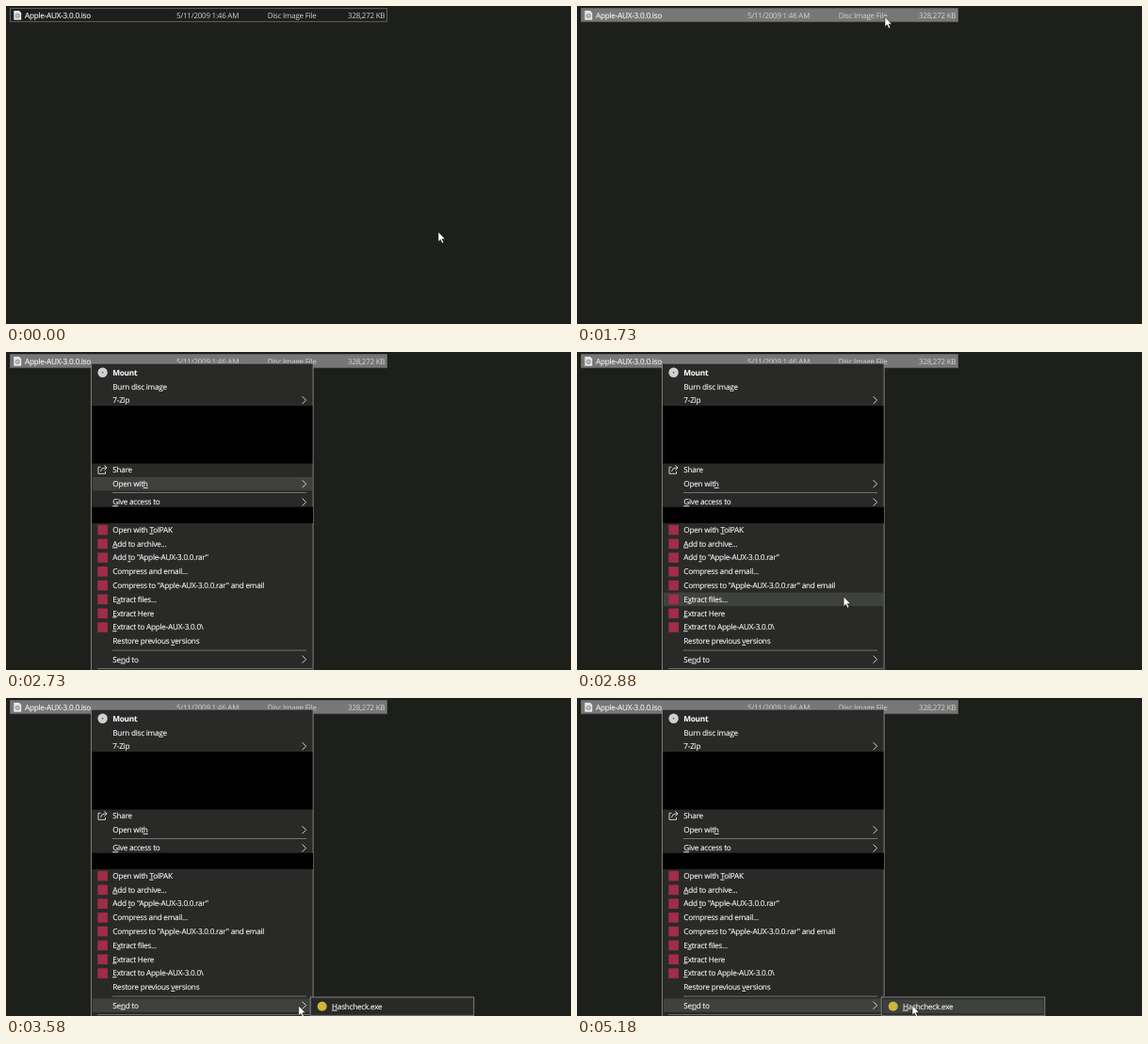
Recreate the animation shown at these times as an HTML page. Size 600 px wide and 338 px high, loop 5.21 s.

```html
<!DOCTYPE html>
<html lang="en">
<head>
<meta charset="utf-8">
<title>Context menu</title>
<style>
  html, body { margin: 0; width: 100%; height: 100%; overflow: hidden; background: #1d1f1b; }
  svg { display: block; width: 600px; height: 338px; }
  text {
    font: 500 8.2px "Open Sans", "Noto Sans", sans-serif;
    letter-spacing: -.24px; text-rendering: geometricPrecision; white-space: pre;
    fill: #f4f4f4; stroke: #f4f4f4; stroke-width: .12;
  }
  .detail { font-size: 8px; font-weight: 400; fill: #d4d4d4; stroke: none; }
  .bold { font-weight: 700; }
  .line { fill: none; stroke: #858585; stroke-width: .8; }
  .sign { fill: none; stroke: #e4e4e4; stroke-width: .9; }
  .panel { fill: #292a28; stroke: #8a8a8a; stroke-width: .9; }
  .active { fill: #3f413e; }
</style>
</head>
<body>
<svg viewBox="0 0 600 338">
  <rect id="row" x="4.5" y="2.6" width="400" height="14.1" stroke="#666865" stroke-width=".9"/>
  <path d="M8.3 5h5.6l2.3 2.2v7.6H8.3z" fill="#e6e6e6"/>
  <circle cx="12.2" cy="10.3" r="2.6" fill="#a5a5a5"/>
  <circle cx="12.2" cy="10.3" r=".8" fill="#eee"/>
  <text x="20" y="12.8">Apple-AUX-3.0.0.iso</text>
  <text class="detail" x="181" y="12.8">5/11/2009 1:46 AM</text>
  <text class="detail" x="277.7" y="12.8">Disc Image File</text>
  <text class="detail" x="402.3" y="12.8" text-anchor="end">328,272 KB</text>

  <g id="menu">
    <rect class="panel" x="90.4" y="12.1" width="235.7" height="340"/>
    <rect id="hover" class="active" x="92" width="233" height="14.4"/>
    <path class="line" d="M113 149.5H319M113 317.1H319M97 336.6H325"/>
    <g id="items"></g>
    <path d="M91 57.2H325.5V118.5H91zM91 164.8H326V182H91z"/>
    <circle cx="102.6" cy="21.8" r="5.2" fill="#cfcfcf"/>
    <circle cx="102.6" cy="21.8" r="1.5" fill="#777" stroke="#eee" stroke-width=".7"/>
    <path class="sign" d="M100.5 122.3H98v7h7.5v-2.3M100.5 127q.6-4 4.5-4h2M104.4 120.3l2.7 2.7-2.7 2.7"/>
  </g>

  <g id="sub">
    <rect class="panel" x="323.2" y="318" width="173.6" height="30"/>
    <rect id="subHover" class="active" x="325" y="320.4" width="170.5" height="14.8"/>
    <path class="line" d="M324 337.4H496.5"/>
    <circle cx="335.7" cy="327.8" r="5" fill="#cdb83c"/>
    <text x="346" y="330.7"><tspan text-decoration="underline">H</tspan>ashcheck.exe</text>
  </g>

  <path id="cursor" d="M0 0V10.6L2.4 8.4 4 12.2 5.8 11.4 4.2 7.7H7.4z" fill="#fff" stroke="#111" stroke-width=".6"/>
</svg>
<script>
const LOOP = 5210;
const $ = id => document.getElementById(id);

// Row centre and label; "_" underlines the next letter.
const items = [
  [21.8, 'Mount'], [36.8, 'Burn disc image'], [51.2, '7-Zip'],
  [125.4, 'Share'], [140.2, 'Open wit_h'], [159.6, '_Give access to'],
  [189, 'Open with _TolPAK'], [203.8, '_Add to archive...'],
  [218.5, 'Add _to "Apple-AUX-3.0.0.rar"'], [233.3, 'Compress and email...'],
  [248, 'Compress to "Apple-AUX-3.0.0.rar" and email'],
  [262.8, 'E_xtract files...'], [277.7, '_Extract Here'],
  [292.5, '_Extract to Apple-AUX-3.0.0\\'],
  [307.2, 'Restore previous _versions'], [326.7, 'Se_nd to']
];
const parents = ['7-Zip', 'Open wit_h', '_Give access to', 'Se_nd to'];

$('items').innerHTML = items.map(([y, label]) => {
  const text = label.replace(/_(.)/, '<tspan text-decoration="underline">$1</tspan>');
  const bold = label === 'Mount' ? ' class="bold"' : '';
  const icon = y > 185 && y < 300
    ? `<rect x="97.3" y="${y - 5.2}" width="10.6" height="10.6" fill="#a12d48"/>` : '';
  const arrow = parents.includes(label)
    ? `<path class="sign" d="M314.6 ${y - 4}l4 4-4 4"/>` : '';
  return `<text x="113.3" y="${y + 2.8}"${bold}>${text}</text>${icon}${arrow}`;
}).join('');

// Pointer path: time, x, y
const path = [
  [0, 459, 240], [30, 459, 240], [420, 325, 16], [540, 326, 14], [640, 327, 11.5],
  [2400, 327, 11.5], [2490, 318, 22], [2730, 300, 140], [2900, 281, 275],
  [3010, 274, 312], [3040, 274, 312], [3130, 279, 325], [3480, 302, 327],
  [3850, 334, 327], [4080, 349, 326], [4150, 349, 326], [4450, 356, 326.5], [LOOP, 356, 326.5]
];

function pointer(t) {
  const i = path.findIndex(p => p[0] > t);
  const [t0, x0, y0] = path[i - 1], [t1, x1, y1] = path[i];
  let k = (t - t0) / (t1 - t0);
  if (t < 420) k = k * k * (3 - 2 * k);
  return [x0 + (x1 - x0) * k, y0 + (y1 - y0) * k];
}

const ramp = (t, from, span) => Math.min(1, Math.max(0, (t - from) / span));
const show = (id, on) => $(id).setAttribute('visibility', on ? 'visible' : 'hidden');
const grey = v => `rgb(${v},${v},${v})`;

function draw(t) {
  const [x, y] = pointer(t);
  const hovered = ramp(t, 450, 60), selected = ramp(t, 590, 60);
  $('row').setAttribute('fill', grey(30 + 47 * hovered + 42 * selected));

  $('menu').setAttribute('opacity', ramp(t, 1940, 90));
  const item = t > 2400 && items.find(([c]) => Math.abs(c - y) < 7.3);
  show('hover', item);
  if (item) $('hover').setAttribute('y', item[0] - 7.2);

  const open = t >= 3480;
  show('sub', open);
  show('subHover', open && x > 323);

  $('cursor').setAttribute('transform', `translate(${x} ${y})`);
  show('cursor', t < 2700 || t > 2780);
}

const start = performance.now();
function tick() {
  draw((performance.now() - start) % LOOP);
  requestAnimationFrame(tick);
}
tick();
</script>
</body>
</html>
```
